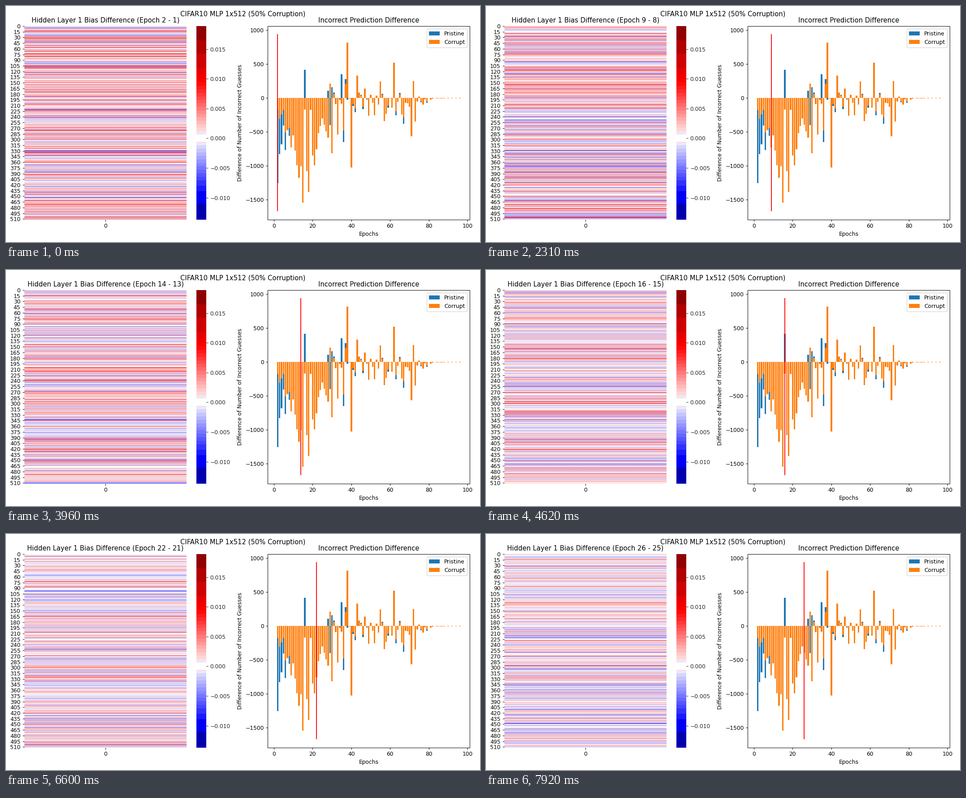
Write a matplotlib script that moves like this. It is 1058x529 px and loops after 8000 ms.

```python
import numpy as np
import matplotlib.pyplot as plt
from matplotlib.animation import FuncAnimation
from matplotlib.colors import BoundaryNorm, ListedColormap

DPI = 529 / 6
W, H = 1058, 529
LOOP_MS, STEP_MS, HOLD_MS = 8000, 40, 330
ROWS, FIRST, LAST = 512, 2, 26
VMAX, VMIN = 0.0189, -0.01368

# Outstanding bars, epoch: change in wrong guesses.
CORRUPT_KEYS = {
    2: -180, 3: -310, 5: -180, 6: -510, 8: -440, 9: -730, 10: -550,
    12: -995, 13: -1175, 14: -1005, 15: -1543, 16: -170, 17: -1075,
    18: -1385, 19: -178, 20: -845, 21: -995, 23: -520, 25: -303, 28: -585,
    29: 210, 30: -812, 33: -540, 36: -480, 38: 812, 40: -1022, 43: 328,
    55: 240, 62: 515, 71: -568, 72: 250, 73: -350,
}
PRISTINE_KEYS = {2: -1255, 3: -830, 4: -685, 5: -410, 6: -770, 8: -560,
                 16: 412, 28: 105, 29: -400, 35: 350, 36: -650}


def guess_changes():
    """Corrupt and pristine bars: a trend, then noise that dies out."""
    rng = np.random.default_rng(10)
    epochs = np.arange(2, 97)
    trend = np.interp(epochs, list(CORRUPT_KEYS), list(CORRUPT_KEYS.values()))
    fade = np.interp(epochs, [28, 65, 80, 84], [1, 0.8, 0.2, 0])
    noise = fade * np.clip(rng.normal(-50, 180, epochs.size), -400, 300)
    tail = np.where((epochs < 88) | (epochs % 2 == 0), -4, 0)
    corrupt = np.where(epochs <= 28, trend, noise + tail)
    reach = rng.choice([0, 1.3], epochs.size, p=[0.6, 0.4])
    pristine = np.where(epochs <= 28, 0, reach * corrupt)
    for bars, keys in ((corrupt, CORRUPT_KEYS), (pristine, PRISTINE_KEYS)):
        bars[np.array(list(keys)) - epochs[0]] = list(keys.values())
    return epochs, corrupt, pristine


def bias_changes():
    """Bias change of every unit, one row of values per epoch."""
    rng = np.random.default_rng(512)
    base, drift = rng.laplace(scale=0.7, size=(2, ROWS))
    table = {}
    for epoch in range(FIRST, LAST + 1):
        age = (epoch - FIRST) / (LAST - FIRST)
        drift = 0.6 * drift + 0.8 * rng.laplace(scale=0.7, size=ROWS)
        spread = 0.0038 - 0.0011 * age
        mean = 0.0011 - 0.0009 * age
        values = mean + spread * (0.4 * base + 0.9 * drift)
        table[epoch] = np.clip(values, VMIN, VMAX)
    return table


def stepped_colors():
    """Seismic colours cut into bands that widen towards the ends."""
    edges = np.concatenate([
        [VMIN, -0.0110, -0.0089, -0.0080],
        np.linspace(-0.0071, -0.0006, 12),
        np.linspace(0.0006, 0.0088, 15),
        [0.0094, 0.0100, 0.0108, 0.0118, 0.0142, 0.0165, VMAX]])
    levels = (edges[:-1] + edges[1:]) / 2
    levels[0] = VMIN
    colors = plt.get_cmap("seismic")(0.5 + levels / (2 * VMAX))
    white = int(np.argmin(np.abs(levels)))
    colors[white] = 1
    colors[[white - 1, white + 1], :3] = 0.943, 0.905, 0.95
    return edges, levels, ListedColormap(colors)


def add_axes(left, right, top=44.6, bottom=478.6):
    return fig.add_axes([left / W, 1 - bottom / H,
                         (right - left) / W, (bottom - top) / H])


def hide_spines(ax):
    for spine in ax.spines.values():
        spine.set_visible(False)


fig = plt.figure(figsize=(12, 6), dpi=DPI, facecolor="white")
fig.suptitle("CIFAR10 MLP 1x512 (50% Corruption)")
changes = bias_changes()
edges, levels, cmap = stepped_colors()
norm = BoundaryNorm(edges, cmap.N, clip=True)

# Heat map of bias changes
heat = add_axes(41, 403)
stripes = heat.imshow(changes[FIRST][:, None], cmap=cmap, norm=norm,
                      aspect="auto", extent=(0, 1, ROWS, 0),
                      interpolation="antialiased",
                      interpolation_stage="rgba")
heat.set_xticks([0.5], ["0"])
ticks = np.arange(0, ROWS, 15)
heat.set_yticks(ticks + 0.5, [str(t) for t in ticks])
hide_spines(heat)
heat_title = heat.set_title("")

# Colour scale
scale = add_axes(425, 447)
scale.pcolormesh([0, 1], edges, levels[:, None], cmap=cmap, norm=norm)
scale.set_ylim(VMIN, VMAX)
scale.set_xticks([])
scale.yaxis.tick_right()
scale.set_yticks(np.arange(-2, 4) * 0.005)
scale.tick_params(colors="0.15")
hide_spines(scale)

# Bars of prediction changes; the marker spans their own y range
chart = add_axes(584.2, 1035.3)
epochs, corrupt, pristine = guess_changes()
chart.bar(epochs, pristine, color="C0", label="Pristine")
chart.bar(epochs, corrupt, color="C1", label="Corrupt")
marker, = chart.plot([FIRST, FIRST], chart.get_ylim(), color="red", lw=1.5)
chart.set(xlabel="Epochs", title="Incorrect Prediction Difference",
          ylabel="Difference of Number of Incorrect Guesses")
chart.legend(loc="upper right")


def update(frame):
    # An epoch shows in any frame whose span reaches its start.
    epoch = FIRST + ((frame + 1) * STEP_MS - 1) // HOLD_MS
    stripes.set_data(changes[epoch][:, None])
    heat_title.set_text(
        f"Hidden Layer 1 Bias Difference (Epoch {epoch} - {epoch - 1})")
    marker.set_xdata([epoch, epoch])
    return stripes, heat_title, marker


anim = FuncAnimation(fig, update, frames=LOOP_MS // STEP_MS,
                     interval=STEP_MS, repeat=True, repeat_delay=0)
plt.show()
```
